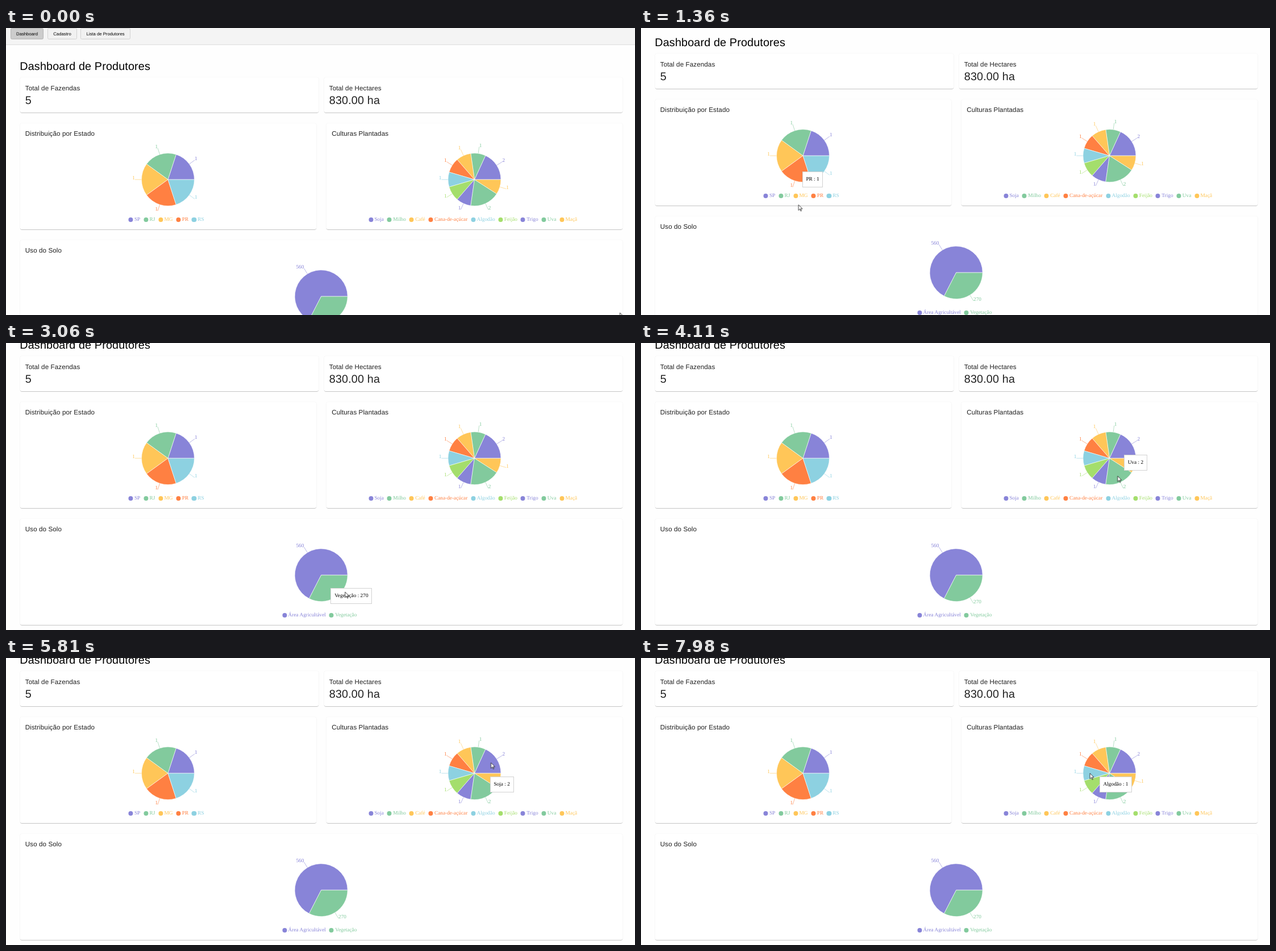
Animation of 1107 by 506 pixels, one loop 8 s. Source, as an HTML page:

```html
<!DOCTYPE html>
<html lang="pt-BR">
<head>
<meta charset="utf-8">
<title>Dashboard de Produtores</title>
<style>
  html, body { margin: 0; width: 100%; height: 100%; overflow: hidden; background: #fefefe; }
  #stage { position: relative; width: 1107px; height: 506px; overflow: hidden; text-rendering: geometricPrecision; }
  #page { position: absolute; left: 0; top: 0; width: 1107px; height: 600px; }
  #page > *, #cursor { position: absolute; }
  #page > svg { left: 0; top: 0; overflow: visible; }
  nav { left: 0; top: 0; width: 1107px; height: 29px; background: #f4f4f4; border-bottom: 1px solid #dedede; }
  nav span {
    position: absolute; top: 0; height: 20px; box-sizing: border-box;
    border: 1px solid #d2d2d2; border-radius: 2.5px; background: #f1f1f1;
    font: 7.75px/19px "Liberation Sans", Arial, sans-serif; text-align: center; color: #000;
  }
  nav .active { background: #ccc; border-color: #b4b4b4; }
  .card {
    height: 187px; background: #fff; border-radius: 2.3px;
    box-shadow: 0 1.16px .58px -.58px rgba(0,0,0,.2), 0 .58px .58px rgba(0,0,0,.14), 0 .58px 1.74px rgba(0,0,0,.12);
  }
  .total { top: 87px; width: 525.5px; height: 62px; }
  .chart { top: 167.5px; width: 521px; }
  .h4 { font: 19.78px "Liberation Sans", Arial, sans-serif; letter-spacing: .00735em; }
  .h6 { font: 11.63px "Liberation Sans", Arial, sans-serif; letter-spacing: .0075em; }
  .label, .legend, .tip { font: 9.3px "Liberation Serif", "Times New Roman", serif; }
  .legend { display: flex; transform: translateX(-50%); line-height: 12px; white-space: nowrap; }
  .legend span { display: flex; align-items: center; margin-right: 5.81px; }
  .legend i { width: 8.13px; height: 8.13px; margin-right: 2.32px; border-radius: 50%; background: currentColor; }
  .tip {
    height: 28px; box-sizing: border-box; padding: 0 5.8px; line-height: 26px;
    border: 1px solid #d2d2d2; background: #fff; color: #000; white-space: nowrap; opacity: 0;
  }
  #cursor { left: 0; top: 0; overflow: visible; }
</style>
</head>
<body>
<div id="stage">
  <div id="page">
    <nav>
      <span class="active" style="left:8px;width:58px">Dashboard</span>
      <span style="left:73px;width:52px">Cadastro</span>
      <span style="left:131px;width:88px">Lista de Produtores</span>
    </nav>
    <div class="card total" style="left:24.5px"></div>
    <div class="card total" style="left:559.5px"></div>
    <div class="card chart" style="left:24.5px"></div>
    <div class="card chart" style="left:564px"></div>
    <div class="card" style="left:24.5px;top:374px;width:1060.5px"></div>
    <svg id="art" width="1107" height="600" fill="#212121">
      <text class="h4" x="24.3" y="74" fill="#000">Dashboard de Produtores</text>
      <text class="h6" x="33.8" y="109.5">Total de Fazendas</text>
      <text class="h4" x="33.8" y="133.7">5</text>
      <text class="h6" x="568.8" y="109.5">Total de Hectares</text>
      <text class="h4" x="568.8" y="133.7">830.00 ha</text>
      <text class="h6" x="33.8" y="190.2">Distribuição por Estado</text>
      <text class="h6" x="573.3" y="190.2">Culturas Plantadas</text>
      <text class="h6" x="33.8" y="396.3">Uso do Solo</text>
    </svg>
  </div>
  <svg id="cursor" width="8" height="12">
    <path d="M0 0V9.9L2.3 7.6L4 11.2L5.3 10.6L3.7 7.1H7Z" fill="#fff" stroke="#111" stroke-width=".8"/>
  </svg>
</div>
<script>
const LOOP = 8000, GLIDE = 400, RADIUS = 46.5, SCALE = 0.581;
const SCROLL = { begin: 1160, end: 1500, distance: 64 };
const COLORS = ['#8884d8', '#82ca9d', '#ffc658', '#ff8042', '#8dd1e1', '#a4de6c'];
const page = document.getElementById('page'), art = document.getElementById('art');

const states = { cx: 285, cy: 267.2, data: { SP: 1, RJ: 1, MG: 1, PR: 1, RS: 1 } };
const crops = { cx: 824.5, cy: 267.2, data: { Soja: 2, Milho: 1, 'Café': 1, 'Cana-de-açúcar': 1, 'Algodão': 1,
  'Feijão': 1, Trigo: 1, Uva: 2, 'Maçã': 1 } };
const land = { cx: 554.7, cy: 473.2, data: { 'Área Agricultável': 560, 'Vegetação': 270 } };

function svg(tag, attrs, text = '') {
  const el = document.createElementNS('http://www.w3.org/2000/svg', tag);
  for (const key in attrs) el.setAttribute(key, attrs[key]);
  el.textContent = text;
  art.append(el);
}

function div(className, left, top, html) {
  const el = document.createElement('div');
  el.className = className;
  Object.assign(el.style, { left: left + 'px', top: top + 'px' });
  el.innerHTML = html;
  page.append(el);
  return el;
}

const polar = (pie, angle, r) => [pie.cx + r * Math.cos(angle), pie.cy - r * Math.sin(angle)];

function drawPie(pie) {
  const entries = Object.entries(pie.data);
  const total = entries.reduce((sum, [, value]) => sum + value, 0);
  let start = 0, legend = '';
  pie.mid = {};
  entries.forEach(([name, value], i) => {
    const color = COLORS[i % COLORS.length];
    const end = start + value / total * 2 * Math.PI, mid = (start + end) / 2;
    const large = end - start > Math.PI ? 1 : 0;
    const [x, y] = polar(pie, mid, RADIUS + 20 * SCALE);
    svg('path', { d: `M${polar(pie, mid, RADIUS)}L${x},${y}`, stroke: color, 'stroke-width': SCALE });
    svg('path', {
      d: `M${pie.cx},${pie.cy}L${polar(pie, start, RADIUS)}A${RADIUS},${RADIUS} 0 ${large} 0 ${polar(pie, end, RADIUS)}Z`,
      fill: color, stroke: '#fff', 'stroke-width': SCALE
    });
    svg('text', { class: 'label', x, y, fill: color, 'text-anchor': x > pie.cx ? 'start' : 'end' }, value);
    legend += `<span style="color:${color}"><i></i>${name}</span>`;
    pie.mid[name] = mid;
    start = end;
  });
  div('legend', pie.cx, pie.cy + 64.5, legend);
}
[states, crops, land].forEach(drawPie);

// The pointer's tour of the page: free points and hovered slices, each with its arrival time.
// turn (radians) and reach (share of the radius) shift the pointer from its usual place in a slice.
const tour = [
  { at: 0, x: 1080.5, y: 502 },
  { at: 470, x: 48, y: 180 },
  { at: 870, pie: states, name: 'PR', turn: 0.14, reach: 0.97 },
  { at: 1800, pie: land, name: 'Área Agricultável', turn: -0.43 },
  { at: 2900, pie: land, name: 'Vegetação' },
  { at: 3340, x: 699, y: 504 },
  { at: 3800, pie: crops, name: 'Soja' },
  { at: 4100, pie: crops, name: 'Uva' },
  { at: 4600, pie: crops, name: 'Maçã' },
  { at: 5720, pie: crops, name: 'Soja' },
  { at: 6400, pie: crops, name: 'Milho' },
  { at: 6700, pie: crops, name: 'Café' },
  { at: 6990, pie: crops, name: 'Cana-de-açúcar', turn: -0.1, reach: 0.64 },
  { at: 7680, pie: crops, name: 'Algodão' }
];

const play = (el, frames) => el.animate(frames, { duration: LOOP, iterations: Infinity });

function pointerAt({ at, x, y, pie, name, turn = 0, reach = 0.74 }) {
  if (pie) [x, y] = polar(pie, pie.mid[name] + turn, RADIUS * reach);
  const scrolled = at > SCROLL.begin ? SCROLL.distance : 0;
  return `translate(${x}px, ${y - scrolled}px)`;
}

// Tooltips sit beside the slice centre and glide over from the previous slice.
function tipSpot({ pie, name }) {
  const [x, y] = polar(pie, pie.mid[name], RADIUS / 2);
  return { left: x + 10 * SCALE + 'px', top: y + 10 * SCALE + 'px' };
}

function showTip(stop, previous, next) {
  const { pie, name, at } = stop;
  const until = !next ? LOOP : next.pie === pie ? next.at : next.at - GLIDE / 2;
  const from = tipSpot(previous?.pie === pie ? previous : stop), to = tipSpot(stop);
  const begin = at / LOOP, settled = Math.min(at + 400, until) / LOOP, end = until / LOOP;
  play(div('tip', 0, 0, `${name} : ${pie.data[name]}`), [
    { offset: 0, opacity: 0, ...from },
    { offset: begin, opacity: 0, ...from },
    { offset: begin, opacity: 1, easing: 'ease', ...from },
    { offset: settled, opacity: 1, ...to },
    { offset: end, opacity: 1, ...to },
    { offset: end, opacity: 0, ...to },
    { offset: 1, opacity: 0, ...to }
  ]);
}

const pointerFrames = tour.flatMap((stop, i) => {
  const next = tour[i + 1], transform = pointerAt(stop);
  if (stop.pie) showTip(stop, tour[i - 1], next);
  const leave = next ? Math.max(stop.at, next.at - GLIDE) : LOOP;
  return [
    { offset: stop.at / LOOP, transform },
    { offset: leave / LOOP, transform, easing: 'ease-in-out' }
  ];
});
play(document.getElementById('cursor'), pointerFrames);

play(page, [
  { offset: 0, top: 0 },
  { offset: SCROLL.begin / LOOP, top: 0, easing: 'ease-in-out' },
  { offset: SCROLL.end / LOOP, top: -SCROLL.distance + 'px' },
  { offset: 1, top: -SCROLL.distance + 'px' }
]);
</script>
</body>
</html>
```
